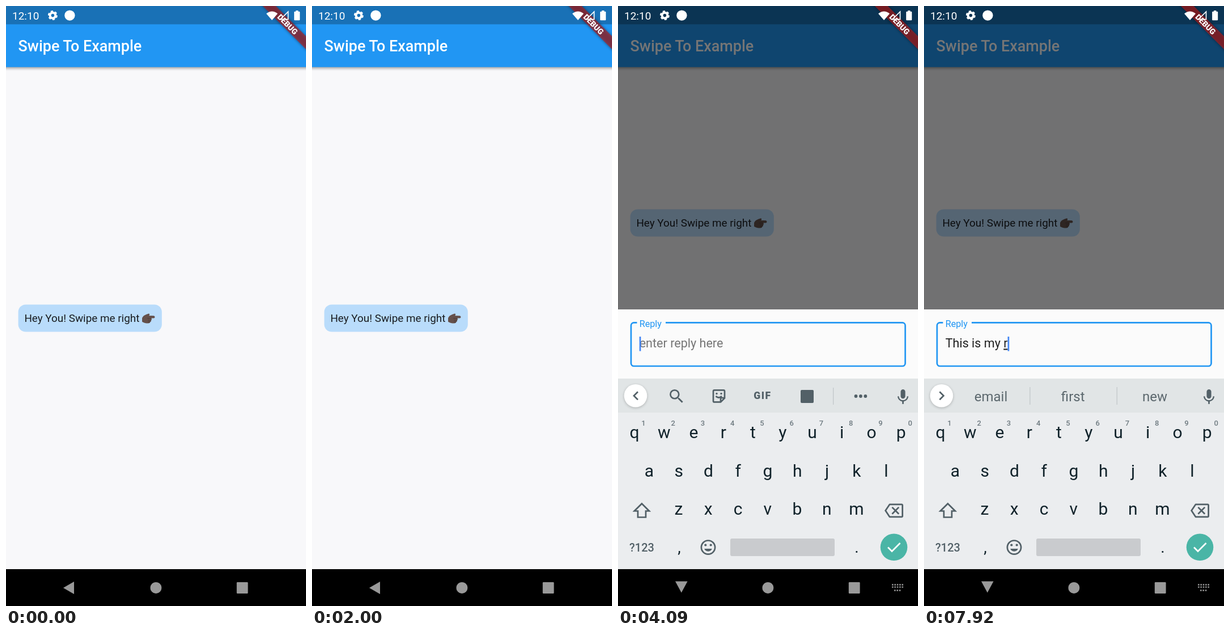
These frames come from a looping animation (529x1058 px, 8000 ms). An HTML page:

```html
<!DOCTYPE html>
<html lang="en">
<head>
<meta charset="utf-8">
<title>Swipe To Example</title>
<style>
  html, body { margin: 0; width: 100%; height: 100%; overflow: hidden; background: #000; }
  svg { display: block; width: 100vw; height: 100vh; }
  text { font-family: Roboto, "Noto Sans", sans-serif; white-space: pre; }
  .mid { text-anchor: middle; }
  .line { fill: none; stroke: #526067; stroke-width: 2.7; }
  .ink { fill: #526067; }
</style>
</head>
<body>
<svg viewBox="0 0 529 1058">
  <defs>
    <filter id="soft" x="-20%" y="-60%" width="140%" height="220%"><feGaussianBlur stdDeviation="2.4"/></filter>
  </defs>

  <!-- page -->
  <rect width="529" height="1058" fill="#f8f8fa"/>
  <rect x="-10" y="92" width="549" height="18" fill="#000" opacity=".36" filter="url(#soft)"/>
  <rect width="529" height="107.7" fill="#2196f3"/>
  <rect width="529" height="32.3" fill="#000" opacity=".25"/>
  <text x="21.6" y="80" font-size="26.94" font-weight="500" fill="#fff">Swipe To Example</text>

  <g id="row">
    <path id="replyIcon" transform="translate(21.9 530.4) scale(1.684)" fill="#82c3fa" d="M10 9V5l-7 7 7 7v-4.1c5 0 8.5 1.6 11 5.1-1-5-4-10-11-11z"/>
    <g id="bubble">
      <rect x="21.6" y="526.5" width="253.2" height="48" rx="13" fill="#b9dcfb"/>
      <text x="32.4" y="557.4" font-size="18.86" fill="#1a1d21">Hey You! Swipe me right</text>
      <g transform="translate(240 541.6) scale(.97)">
        <path fill="#65504b" d="M0 9C2 4 7 2.500 11 1.200C13.500 .4 14.500 2.500 12.500 4.600L21 4.800C23.800 5 23.800 9 21 9.100L16.500 9.300C18 10.500 17.500 12.500 16.200 13C16.700 15 15.700 16 14.600 16C14.600 18 13 18.500 11 18.500C7 18.500 3 17.500 0 15.500Z"/>
        <path fill="none" stroke="#4a3a37" d="M9.500 9.400H17M10.500 12.900H16.200M10.500 16H14.600"/>
      </g>
    </g>
  </g>
  <rect id="scrim" width="529" height="1058" fill="#000"/>

  <!-- reply sheet -->
  <g id="sheet">
    <rect y="535" width="529" height="460" fill="#fbfbfb"/>
    <path fill="none" stroke="#2196f3" stroke-width="2.7" d="M84 558.400H501.500a5 5 0 0 1 5 5V630a5 5 0 0 1-5 5H28a5 5 0 0 1-5-5V563.400a5 5 0 0 1 5-5H33.500"/>
    <text x="37.700" y="566" font-size="16.160" fill="#2196f3">Reply</text>
    <text id="hint" x="37.700" y="602.300" font-size="21.550" fill="#757575">enter reply here</text>
    <text x="37.700" y="602.300" font-size="21.550" fill="#202020"><tspan id="done"></tspan><tspan id="word" text-decoration="underline"></tspan></text>
    <rect id="cursor" y="583" width="2.700" height="25.500" fill="#4285f4"/>
  </g>

  <!-- navigation bar and keyboard -->
  <rect y="993" width="529" height="65" fill="#000"/>
  <g id="keyboard">
    <rect y="657" width="529" height="336" fill="#ebedef"/>
    <rect y="657" width="529" height="60" fill="#e1e5e6"/>
    <rect y="993" width="529" height="65" fill="#000"/>
    <circle cx="31" cy="688.500" r="20" fill="#000" opacity=".25" filter="url(#soft)"/>
    <circle cx="31" cy="687.300" r="20.300" fill="#fff"/>
    <path id="chevron" class="line" d="M35 680.300l-7 7 7 7"/>
    <path class="ink" transform="translate(486.300 673.300) scale(1.350)" d="M12 14c1.660 0 3-1.340 3-3V5c0-1.660-1.340-3-3-3S9 3.340 9 5v6c0 1.660 1.340 3 3 3zm5.300-3c0 3-2.540 5.100-5.300 5.100S6.700 14 6.700 11H5c0 3.410 2.720 6.230 6 6.720V21h2v-3.280c3.280-.48 6-3.300 6-6.720z"/>

    <g id="tools">
      <path class="ink" transform="translate(87 672) scale(1.350)" d="M15.500 14h-.79l-.28-.27A6.471 6.471 0 0 0 16 9.500 6.500 6.500 0 1 0 9.500 16c1.610 0 3.090-.59 4.230-1.570l.27.28v.79l5 4.990L20.490 19l-4.990-5zm-6 0C7.010 14 5 11.990 5 9.500S7.010 5 9.500 5 14 7.010 14 9.500 11.990 14 9.500 14z"/>
      <path class="line" d="M170 677.400H186a2 2 0 0 1 2 2V691.500L181 698.400H170a2 2 0 0 1-2-2V679.400a2 2 0 0 1 2-2zM188 691H182.500a1.500 1.500 0 0 0-1.500 1.500V698"/>
      <path class="line" stroke-width="2" d="M172.500 688q5 5 10.500 0"/>
      <circle class="ink" cx="174" cy="683.500" r="1.700"/><circle class="ink" cx="182" cy="683.500" r="1.700"/>
      <text class="mid ink" x="255" y="693.200" font-size="17.500" font-weight="900" letter-spacing="1.500">GIF</text>
      <rect class="ink" x="322" y="677" width="23" height="23" rx="2"/>
      <rect x="379" y="673" width="1.300" height="30" fill="#c2c7ca"/>
      <circle class="ink" cx="419.500" cy="688" r="2.900"/><circle class="ink" cx="427.900" cy="688" r="2.900"/><circle class="ink" cx="436.300" cy="688" r="2.900"/>
    </g>
    <g id="words" font-size="24" fill="#5c686e">
      <rect x="186.200" y="672" width="1.300" height="31" fill="#c2c7ca"/>
      <rect x="339.600" y="672" width="1.300" height="31" fill="#c2c7ca"/>
      <text class="mid" x="118" y="697"></text>
      <text class="mid" x="262.700" y="697"></text>
      <text class="mid" x="407" y="697"></text>
    </g>

    <g id="keys" font-size="30" fill="#10222a"></g>
    <g id="digits" font-size="13" font-weight="500" fill="#6e7a80"></g>
    <path class="line" d="M42 877.500L55 890.500H49V901.500H35V890.500H28.800Z"/>
    <path class="ink" transform="translate(470 873.300) scale(1.375)" d="M22 3H7c-.69 0-1.230.35-1.590.88L0 12l5.410 8.110c.36.53.9.89 1.590.89h15c1.100 0 2-.9 2-2V5c0-1.100-.9-2-2-2zm0 16H7.070L2.400 12l4.660-7H22v14zm-11.590-2L14 13.410 17.590 17 19 15.590 15.410 12 19 8.410 17.590 7 14 10.590 10.410 7 9 8.410 12.590 12 9 15.590z"/>
    <text class="mid ink" x="42" y="962" font-size="20" font-weight="500">?123</text>
    <text class="mid" x="108" y="964" font-size="28" fill="#10222a">,</text>
    <text class="mid" x="421" y="964" font-size="28" fill="#10222a">.</text>
    <circle class="line" cx="159" cy="954.600" r="12.100"/>
    <circle class="ink" cx="154.300" cy="950.500" r="2.100"/><circle class="ink" cx="163.700" cy="950.500" r="2.100"/>
    <path class="ink" d="M152.200 957H165.800a7.300 7.300 0 0 1-13.600 0z"/>
    <rect x="198" y="939" width="184" height="31" rx="3" fill="#c9cbce"/>
    <circle cx="486.500" cy="954.300" r="23.800" fill="#4ab5a6"/>
    <path fill="none" stroke="#fff" stroke-width="2.700" d="M476 954.500l7 7 14.500-14.500"/>
  </g>

  <g fill="#999">
    <path id="back" d="M101 1026L120 1015V1037Z"/>
    <path id="down" d="M101 1014.500H122.600L111.800 1034.500Z"/>
    <circle cx="264.400" cy="1025.900" r="10"/>
    <rect x="406.800" y="1016" width="19.800" height="20" rx="1.300"/>
    <path id="switcher" fill="none" stroke="#999" stroke-width="2.300" d="M483 1020.500H503M483 1024.700H503M487 1030.500H499" stroke-dasharray="2.600 1.750"/>
  </g>

  <!-- corner banner -->
  <g transform="translate(529 0) rotate(45)">
    <rect x="-70" y="37.700" width="140" height="16.200" fill="#000" opacity=".45" filter="url(#soft)"/>
    <rect x="-70" y="37.700" width="140" height="16.200" fill="#b71c1c" opacity=".627"/>
    <text class="mid" x="0" y="50.700" font-size="13.740" font-weight="900" fill="#fff">DEBUG</text>
  </g>

  <!-- status bar -->
  <g fill="#fff">
    <text x="11" y="23.600" font-size="19">12:10</text>
    <circle cx="82.400" cy="16.600" r="4.800" fill="none" stroke="#fff" stroke-width="4"/>
    <circle cx="82.400" cy="16.600" r="7.300" fill="none" stroke="#fff" stroke-width="2.400" stroke-dasharray="4.200 3.445"/>
    <circle cx="112.400" cy="16.600" r="9.200"/>
    <path d="M459 13.500Q469 5.500 479 13.500L469 25Z"/>
    <path fill="none" stroke="#fff" stroke-width="1.700" d="M497.500 10V23.700H483.800Z"/>
    <path d="M511 8H515.300V9.800H517a1.200 1.200 0 0 1 1.200 1.200V24a1.200 1.200 0 0 1-1.200 1.200H509.300a1.200 1.200 0 0 1-1.200-1.200V11a1.200 1.200 0 0 1 1.200-1.200H511Z"/>
  </g>
</svg>
<script>
const LOOP = 8000;
const SWIPE = 3480, RETURN = 3780, STEP = 150;
const KEYS_IN = 3660, SHEET_IN = 3790, RESIZE = 3800;
const FIRST = 6230, SECOND = 6350, GAP = 151;
const MESSAGE = "This is my r";
const HINTS = [
  "", "T The Thanks", "Th Thanks Thank", "Thi This Think", "This This Thus",
  "is was will", "I in is", "is is isn't", "a the my",
  "m my me", "my my may", "email first new", "email first new"
].map(s => s.split(" "));

const $ = id => document.getElementById(id);
const el = {};
document.querySelectorAll("svg [id]").forEach(n => el[n.id] = n);
const clamp = x => Math.max(0, Math.min(1, x));
const part = (t, start, span) => clamp((t - start) / span);
const out = (x, power) => 1 - (1 - x) ** power;
const show = (node, on) => node.style.display = on ? "" : "none";
const move = (node, x, y) => node.setAttribute("transform", `translate(${x} ${y})`);
const pen = document.createElement("canvas").getContext("2d");

function letters(parent, chars, x, y) {
  [...chars].forEach((c, i) => {
    const n = document.createElementNS("http://www.w3.org/2000/svg", "text");
    n.setAttribute("class", "mid");
    n.setAttribute("x", x + i * 52.25);
    n.setAttribute("y", y);
    n.textContent = c;
    parent.append(n);
  });
}
letters(el.keys, "qwertyuiop", 29, 761.5);
letters(el.keys, "asdfghjkl", 55, 829.5);
letters(el.keys, "zxcvbnm", 107, 897.3);
letters(el.digits, "1234567890", 45, 740);

function typedCount(t) {
  if (t < FIRST) return 0;
  if (t < SECOND) return 1;
  return Math.min(MESSAGE.length, 2 + Math.floor((t - SECOND) / GAP));
}

function drawInput(t, count) {
  const text = MESSAGE.slice(0, count);
  const cut = text.lastIndexOf(" ") + 1;
  el.done.textContent = text.slice(0, cut);
  el.word.textContent = text.slice(cut);
  el.hint.setAttribute("opacity", 1 - part(t, FIRST, 200));
  pen.font = "21.55px Roboto, 'Noto Sans', sans-serif";
  el.cursor.setAttribute("x", 37.7 + pen.measureText(text).width);
  show(el.cursor, count > 0 || (t - 3850) % 1000 < 500);
}

function drawSuggestions(count) {
  show(el.tools, !count);
  show(el.words, count);
  el.chevron.setAttribute("d", count ? "M27.500 680.300l7 7-7 7" : "M35 680.300l-7 7 7 7");
  const composing = count && count < 11 && MESSAGE[count - 1] !== " ";
  [...el.words.querySelectorAll("text")].forEach((n, i) => {
    const bold = composing && i === 1;
    n.textContent = HINTS[count][i] || "";
    n.setAttribute("font-weight", bold ? 700 : 400);
    n.setAttribute("fill", bold ? "#0a0f12" : "#5c686e");
  });
}

function draw(t) {
  const drive = t < RETURN ? part(t, SWIPE, STEP) : 1 - part(t, RETURN, STEP);
  const swipe = out(drive, 2);
  move(el.bubble, 76 * swipe, 0);
  el.replyIcon.setAttribute("opacity", swipe);
  move(el.row, 0, t < RESIZE ? 0 : -168);

  const rise = out(part(t, SHEET_IN, 250), 3);
  el.scrim.setAttribute("opacity", 0.54 * rise);
  show(el.sheet, rise > 0);
  move(el.sheet, 0, 122 * (1 - rise));

  const open = t >= KEYS_IN;
  const slide = out(part(t, KEYS_IN, 200), 5);
  show(el.keyboard, open);
  move(el.keyboard, 0, 40 * (1 - slide));
  el.keyboard.setAttribute("opacity", slide);
  show(el.back, !open);
  show(el.down, open);
  show(el.switcher, open);

  const count = typedCount(t);
  drawInput(t, count);
  drawSuggestions(count);
}

const begin = performance.now();
function tick() {
  draw((performance.now() - begin) % LOOP);
  requestAnimationFrame(tick);
}
tick();
</script>
</body>
</html>
```
